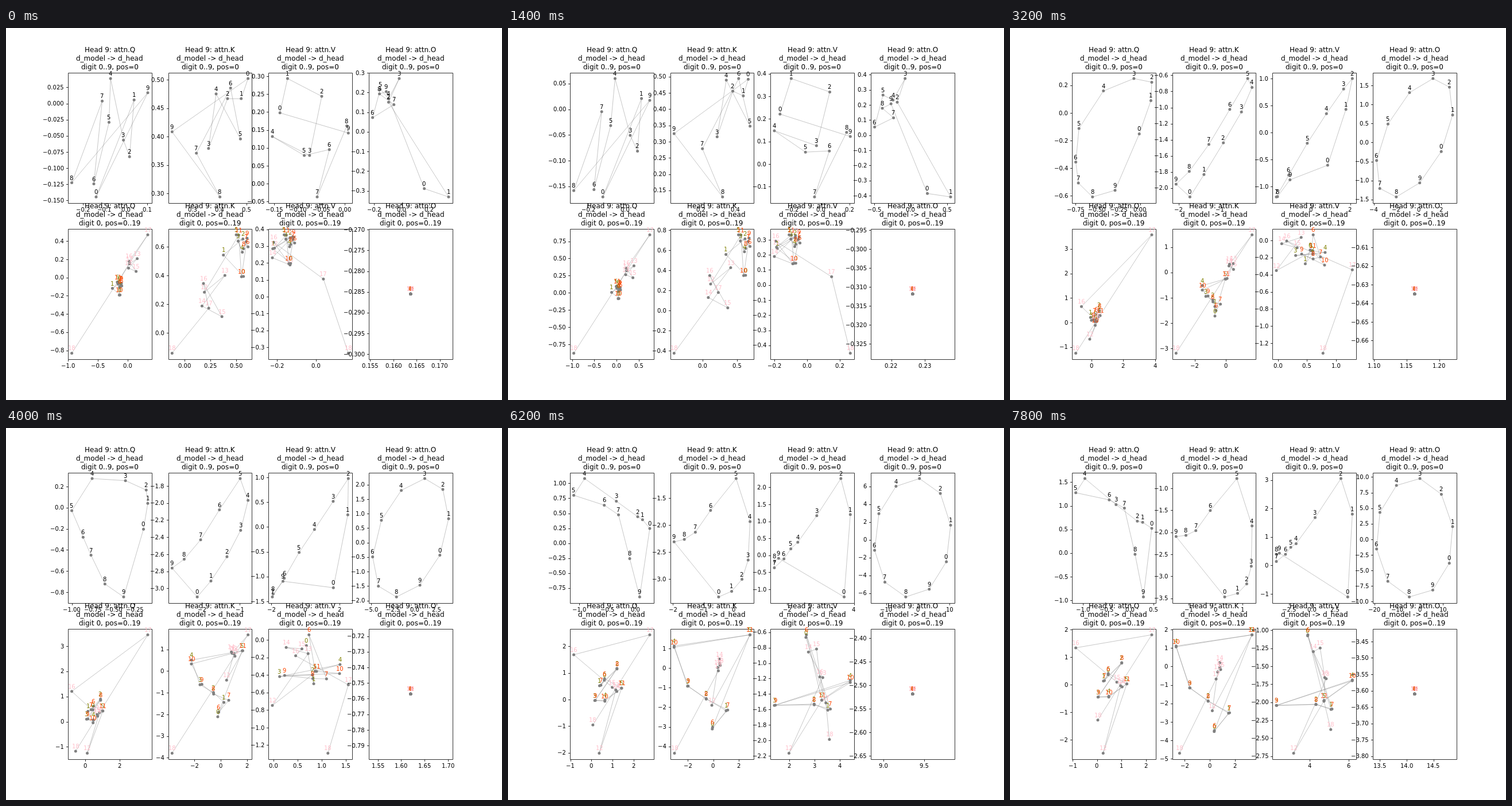
Write an HTML page with a canvas that moves like this. It is 864x648 px and loops after 8000 ms.

```html
<!DOCTYPE html>
<html lang="en">
<head>
<meta charset="utf-8">
<title>Attention head 9 projections</title>
<style>
  html, body { margin: 0; width: 100%; height: 100%; overflow: hidden; background: #fff; }
  canvas { display: block; }
</style>
</head>
<body>
<canvas id="stage" width="864" height="648"></canvas>
<script>
const ctx = document.getElementById('stage').getContext('2d');
const LOOP = 8000, STEP = 200, LAST = 7800;
const AXES = { left: 108, top: 77.76, width: 145.565, height: 226.8, dx: 174.678, dy: 272.16 };

const lerp = (a, b, k) => a + (b - a) * k;
const mix = (a, b, k) => a.map((v, i) => Array.isArray(v) ? mix(v, b[i], k) : lerp(v, b[i], k));
const span = values => [Math.min(...values), Math.max(...values)];
const range = (count, make) => Array.from({ length: count }, (_, n) => make(n));

// Repeatable noise in -1..1.
function noise(n, seed) {
  const v = Math.sin(n * 127.1 + seed * 311.7) * 43758.5453;
  return (v - Math.floor(v)) * 2 - 1;
}
const jitter = ([x, y], n, spread) => [x + spread * noise(n, 1), y + spread * noise(n, 2)];

// Poses are in percent of the panel's data span, y upwards.
const pose = (...flat) => range(flat.length / 2, n => [flat[2 * n], flat[2 * n + 1]]);

// Ten digits around one cycle; each axis peaks at its own digit.
const wave = (...peaks) => range(10, n => peaks.map(p => 50 + 50 * Math.cos((n - p) * Math.PI / 5)));

// Positions 0..11 and 12..16 gather around two centres; 17 and 18 are outliers.
const cluster = (spread, head, tail, p17, p18) =>
  [...range(17, n => jitter(n < 12 ? head : tail, n, spread)), p17, p18];

// Positions 6..11 revisit the places of 0..5.
const repeated = points => [...range(12, n => jitter(points[n % 6], n, .8)), ...points.slice(6)];

// Extents are [xMin, xMax, yMin, yMax] at each of GROWTH.times.
const GROWTH = {
  times: [0, 2400, 4000, LAST],
  easing: [k => k ** 4, k => k, k => k * k * (3 - 2 * k)]
};

const panels = [
  { letter: 'Q', row: 0,
    extents: [[-.252, .103, -.1445, .0387], [-.496, .367, -.37, .221], [-1, -.095, -.845, .276], [-1.15, .463, -.93, 1.578]],
    start: pose(32,0, 82,82, 76,34, 68,48, 51,100, 49,63, 29,11, 40,81, 0,12, 100,88),
    middle: wave(1.7, 2.4),
    end: pose(100,58, 88,63, 81,64, 53,78, 12,100, 0,88, 44,82, 64,75, 78,36, 89,0) },
  { letter: 'K', row: 0,
    extents: [[.224, .5055, .294, .502], [-1.34, .34, -1.123, .433], [-2.78, -.78, -3.1, -1.713], [-1.46, 1.353, -3.47, -.78]],
    start: pose(100,100, 91,83, 73,83, 48,41, 58,87, 90,49, 77,92, 32,37, 63,0, 0,55),
    middle: wave(4.5, 4.2),
    end: pose(64,0, 81,3, 93,11, 99,26, 100,60, 80,100, 45,73, 26,56, 13,52, 0,51) },
  { letter: 'V', row: 0,
    extents: [[-.154, .0077, -.0368, .2935], [-1.57, 1.7, -.978, 1.03], [-1.93, 2.515, -1.41, .976], [-3.87, 4.39, -1.106, 3.05]],
    start: pose(10,71, 20,100, 65,85, 49,35, 0,51, 42,35, 75,40, 59,0, 98,60, 100,54),
    middle: wave(2.4, 2.6),
    end: pose(94,0, 100,70, 85,100, 51,67, 26,45, 19,42, 12,36, 0,30, 0,36, 4,37) },
  { letter: 'O', row: 0,
    extents: [[-.21, .342, -.331, .2706], [-2.665, 2.145, -.992, 1.161], [-4.82, 3.88, -1.875, 2.21], [-19.07, 14.28, -9.24, 9.76]],
    start: pose(68,7, 100,0, 21,80, 35,100, 21,83, 10,91, 0,67, 28,78, 9,87, 18,89),
    middle: wave(1.5, 2.75),
    end: wave(.72, 3.2) },
  { letter: 'Q', row: 1,
    extents: [[-.937, .337, -.831, .471], [-1.17, 3.92, -1.25, 3.703], [-.78, 3.63, -1.249, 3.45], [-.869, 2.234, -2.488, 1.808]],
    start: cluster(7, [59, 55], [80, 76], [100, 100], [0, 0]),
    middle: cluster(4, [25, 26], [23, 26], [100, 100], [0, 0]),
    end: repeated(pose(42,67, 37,61, 60,76, 29,47, 43,48, 67,58, 36,0, 59,57, 61,56, 54,60, 0,89, 100,100, 29,28)) },
  { letter: 'K', row: 1,
    extents: [[-.12, .6145, -.1415, .683], [-2.667, 1.223, -2.583, 1.297], [-3.68, 2.07, -3.786, 1.669], [-2.668, 3.345, -4.687, 1.713]],
    start: cluster(18, [80, 66], [52, 42], [47, 30], [0, 0]),
    middle: cluster(5, [40, 36], [66, 65], [100, 100], [0, 0]),
    end: repeated(pose(50,19, 70,34, 42,44, 18,55, 0,91, 100,100, 48,36, 55,69, 58,77, 58,73, 59,71, 53,63, 5,0)) },
  { letter: 'V', row: 1,
    extents: [[-.2235, .1656, -.3355, .367], [-.032, 1.018, -1.341, .074], [-.024, 1.551, -1.291, .057], [2.295, 6.185, -2.707, -1.062]],
    start: cluster(15, [21, 85], [20, 86], [70, 60], [100, 0]),
    middle: cluster(13, [40, 80], [15, 88], [100, 71], [55, 0]),
    end: repeated(pose(41,100, 73,37, 52,41, 0,40, 100,62, 63,44, 23,0, 66,63, 49,86, 58,89, 64,64, 63,44, 72,20)) },
  { letter: 'O', row: 1,
    extents: [[.1637, -.2855], [.705, -.513], [1.62, -.757], [14.15, -3.61]].map(([x, y]) => [x, x, y, y]) }
];
for (const panel of panels.filter(p => !p.start)) {
  panel.start = panel.middle = panel.end = cluster(1, [50, 50], [50, 50], [50, 50], [50, 50]);
}

function extentsAt(extents, time) {
  const { times, easing } = GROWTH;
  const i = times.findLastIndex((t, n) => n < easing.length && t <= time);
  return mix(extents[i], extents[i + 1], easing[i]((time - times[i]) / (times[i + 1] - times[i])));
}

function shapeAt({ start, middle, end }, time) {
  const turn = GROWTH.times[1];
  return time < turn
    ? mix(start, middle, (time / turn) ** 4)
    : mix(middle, end, 1 - ((LAST - time) / (LAST - turn)) ** 2);
}

// Stretches the shape so that it fills the current extents.
function pointsAt(panel, time) {
  const [xMin, xMax, yMin, yMax] = extentsAt(panel.extents, time);
  const shape = shapeAt(panel, time);
  const [x0, x1] = span(shape.map(p => p[0]));
  const [y0, y1] = span(shape.map(p => p[1]));
  return shape.map(([x, y]) => [lerp(xMin, xMax, (x - x0) / (x1 - x0)), lerp(yMin, yMax, (y - y0) / (y1 - y0))]);
}

// Limits with a 5% margin; a single value is widened first.
function limits(values) {
  let [lo, hi] = span(values);
  if (hi - lo < 1e-9) {
    const pad = Math.abs(lo) * .05;
    lo -= pad;
    hi += pad;
  }
  const margin = (hi - lo) * .05;
  return [lo - margin, hi + margin];
}

function ticks([lo, hi], bins) {
  const raw = (hi - lo) / bins;
  const magnitude = 10 ** Math.floor(Math.log10(raw));
  const steps = [.1, .2, .25, .5, 1, 2, 2.5, 5, 10].map(s => s * magnitude);
  let i = steps.findIndex(s => s >= raw), values, step;
  do {
    step = steps[i];
    values = [];
    for (let n = Math.ceil(lo / step); n * step <= hi; n++) values.push(n * step);
  } while (values.length < 2 && i-- > 0);
  let decimals = 0;
  while (Math.abs(step * 10 ** decimals - Math.round(step * 10 ** decimals)) > 1e-6) decimals++;
  return values.map(value => ({ value, label: value.toFixed(decimals).replace('-', '\u2212') }));
}

// anchor: 0.5 centres the text on x, 1 ends it there.
function text(string, x, y, { size = 10, anchor = .5, color = '#000' } = {}) {
  ctx.font = `${size}px "DejaVu Sans", sans-serif`;
  ctx.fillStyle = color;
  ctx.fillText(string, Math.round(x - anchor * ctx.measureText(string).width), Math.round(y));
}

function line(points, color, width, closed) {
  ctx.beginPath();
  points.forEach(([x, y]) => ctx.lineTo(x, y));
  if (closed) ctx.closePath();
  ctx.strokeStyle = color;
  ctx.lineWidth = width;
  ctx.stroke();
}

const snap = v => Math.round(v) + .5;
const groupColor = n => n < 6 ? 'olive' : n < 12 ? 'orangered' : 'pink';

function drawPanel(panel, time) {
  const { letter, row } = panel;
  const left = AXES.left + 'QKVO'.indexOf(letter) * AXES.dx, right = left + AXES.width;
  const top = AXES.top + row * AXES.dy, bottom = top + AXES.height;
  const data = pointsAt(panel, time);
  const xLim = limits(data.map(p => p[0])), yLim = limits(data.map(p => p[1]));
  const px = v => lerp(left, right, (v - xLim[0]) / (xLim[1] - xLim[0]));
  const py = v => lerp(bottom, top, (v - yLim[0]) / (yLim[1] - yLim[0]));
  const points = data.map(([x, y]) => [px(x), py(y)]);

  ctx.fillStyle = '#fff';
  ctx.fillRect(left, top, AXES.width, AXES.height);
  line(points, 'gray', .45, row === 0);
  ctx.fillStyle = 'gray';
  for (const [x, y] of points) {
    ctx.beginPath();
    ctx.arc(x, y, 2.5, 0, 2 * Math.PI);
    ctx.fill();
  }

  const [l, r, t, b] = [left, right, top, bottom].map(snap);
  for (const { value, label } of ticks(xLim, 4)) {
    const x = snap(px(value));
    line([[x, b], [x, b + 3.5]], '#000', .8);
    text(label, px(value), bottom + 15);
  }
  for (const { value, label } of ticks(yLim, 9)) {
    const y = snap(py(value));
    line([[l - 3.5, y], [l, y]], '#000', .8);
    text(label, left - 7, py(value) + 3.6, { anchor: 1 });
  }
  line([[l, t], [r, t], [r, b], [l, b]], '#000', .8, true);

  points.forEach(([x, y], n) => text(String(n), x, y - 5, { color: row ? groupColor(n) : '#000' }));
  const caption = row ? 'digit 0, pos=0..19' : 'digit 0..9, pos=0';
  [`Head 9: attn.${letter}`, 'd_model -> d_head', caption].forEach((s, i) =>
    text(s, (left + right) / 2, top - 36 + 15 * i, { size: 12 }));
}

function frame(now) {
  const time = Math.floor((now % LOOP) / STEP) * STEP;
  ctx.fillStyle = '#fff';
  ctx.fillRect(0, 0, 864, 648);
  panels.forEach(panel => drawPanel(panel, time));
  requestAnimationFrame(frame);
}
requestAnimationFrame(frame);
</script>
</body>
</html>
```
